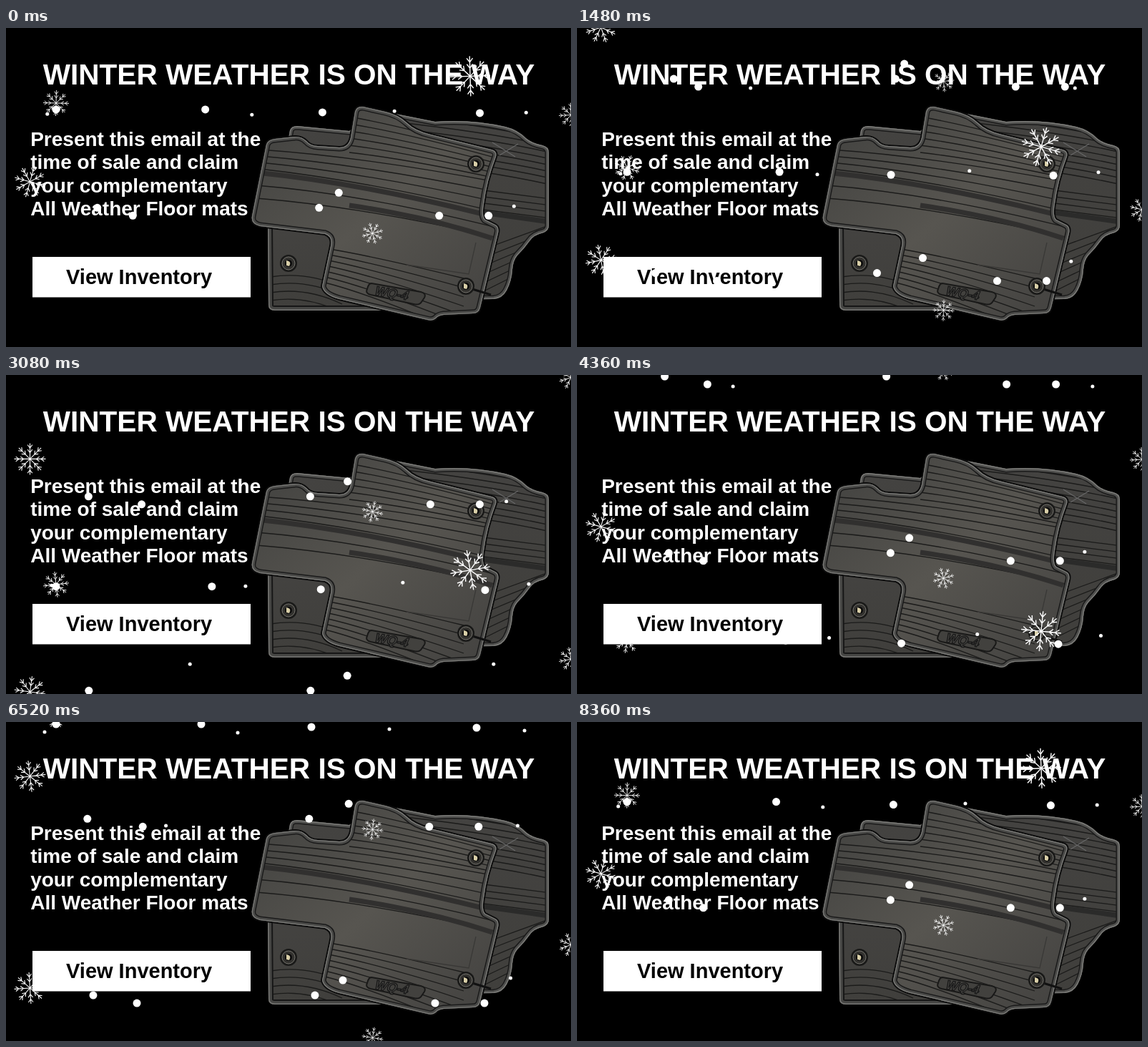
These frames come from a looping animation (790x446 px, 8400 ms). An HTML page:

```html
<!DOCTYPE html>
<html lang="en">
<head>
<meta charset="utf-8">
<title>Winter floor mats</title>
<style>
html, body { margin: 0; width: 100%; height: 100%; overflow: hidden; background: #000; }
svg { display: block; width: 790px; height: 446px; }
text { font-family: "Liberation Sans", Arial, sans-serif; font-weight: bold; }
</style>
</head>
<body>
<svg viewBox="0 0 790 446" xmlns="http://www.w3.org/2000/svg">
  <defs>
    <linearGradient id="rubber" x1="0" y1="0" x2="1" y2="1">
      <stop offset="0" stop-color="#40403e"/>
      <stop offset=".5" stop-color="#575550"/>
      <stop offset="1" stop-color="#42413f"/>
    </linearGradient>
    <linearGradient id="shade" x1="0" y1="0" x2="0" y2="1">
      <stop offset="0" stop-color="#444341"/>
      <stop offset="1" stop-color="#403f3c"/>
    </linearGradient>
    <path id="back" d="M394 160L397 143Q399 137 407 137L480 144L520 115L600 131Q650 127 698 138Q715 142 727 154Q735 161 750 164Q759 166 759 174L759 276Q759 283 752 286Q738 289 732 298Q725 308 715 318Q709 325 708 338Q707 354 700 367Q694 378 682 379L600 380L394 270Z"/>
    <path id="low" d="M366 270L367 387Q367 395 376 395L560 395L668 372L660 260Z"/>
    <path id="front" d="M488 117Q490 109 499 110L530 117Q548 121 560 132Q572 144 594 149L679 170Q687 172 685 180Q672 214 668 246Q665 263 670 268L684 275Q690 278 688 287L669 366L663 391Q661 399 653 399L612 401Q604 402 601 406Q597 410 589 408L466 379Q444 373 442 361L454 305Q457 292 446 288L355 277Q342 274 344 263L364 163Q366 156 376 155L403 152Q413 151 420 158Q426 165 436 165L466 167Q479 167 482 153Z"/>
    <clipPath id="inBack"><use href="#back"/></clipPath>
    <clipPath id="inLow"><use href="#low"/></clipPath>
    <clipPath id="inFront"><use href="#front"/></clipPath>
    <g id="grommet">
      <circle r="12" fill="#191918"/>
      <circle r="9" fill="#33322f" stroke="#77756f"/>
      <circle r="5" fill="#0b0b0b"/>
      <path d="M-3 -4Q5 -3 1 4L-3 3Z" fill="#d9cfa8"/>
    </g>
    <g id="flake" fill="none" stroke="#fff"></g>
  </defs>
  <rect width="790" height="446"/>

  <g fill="none" stroke="#1b1b1a" stroke-width="1.3">
    <use href="#back" fill="url(#shade)" stroke="none"/>
    <g clip-path="url(#inBack)">
      <path id="backRibs"/>
      <path d="M660 257L760 271" stroke="#2b2b2a" stroke-width="7"/>
      <path d="M680 160L712 180M690 178L716 162" stroke="#666"/>
      <use href="#back" stroke="#1a1a1a" stroke-width="11"/>
      <use href="#back" stroke="#50504e" stroke-width="8"/>
      <use href="#back" stroke="#7a7a77" stroke-width="3"/>
    </g>
    <use href="#low" fill="url(#shade)" stroke="none"/>
    <g clip-path="url(#inLow)">
      <path id="lowRibs"/>
      <use href="#low" stroke="#161616" stroke-width="14"/>
      <use href="#low" stroke="#464644" stroke-width="10"/>
      <use href="#low" stroke="#777774" stroke-width="3"/>
    </g>
    <use href="#front" stroke="#0c0c0c" stroke-width="4"/>
    <use href="#front" fill="url(#rubber)" stroke="none"/>
    <g clip-path="url(#inFront)">
      <path id="frontRibs"/>
      <path d="M350 202Q500 217 690 266M480 248Q590 264 680 294" stroke="#31302f" stroke-width="7"/>
      <path d="M657 300L647 344L560 331" stroke="#393836"/>
      <use href="#front" stroke="#1a1a1a" stroke-width="11"/>
      <use href="#front" stroke="#4a4a48" stroke-width="8"/>
      <use href="#front" stroke="#7c7c79" stroke-width="2.5"/>
    </g>
    <path d="M511 357L580 369Q588 371 585 377L581 383Q578 388 570 386L510 373Q502 371 505 365Q507 357 511 357Z" fill="#42413e" stroke="#191918" stroke-width="2"/>
    <text transform="translate(514 373) rotate(9) skewX(-15)" font-size="18" fill="#4a4946" stroke="#181818">WQ-4</text>
    <path d="M652 365L678 373" stroke="#111" stroke-width="3"/>
  </g>
  <use href="#grommet" x="657" y="190"/>
  <use href="#grommet" x="395" y="329"/>
  <use href="#grommet" x="643" y="361"/>

  <g fill="#fff">
    <text x="51.7" y="78.5" font-size="40.6">WINTER WEATHER IS ON THE WAY</text>
    <g font-size="28">
      <text x="34.2" y="165">Present this email at the</text>
      <text x="34.2" y="197">time of sale and claim</text>
      <text x="34.2" y="230">your complementary</text>
      <text x="34.2" y="262">All Weather Floor mats</text>
    </g>
    <rect x="37" y="320" width="305" height="56.5"/>
    <text x="84" y="358" font-size="29" fill="#000">View Inventory</text>
    <g id="snow"></g>
  </g>
</svg>
<script>
const LOOP = 8400, STEP = 40, LEAD = 400;
const $ = id => document.getElementById(id);
const range = (n, f) => Array.from({ length: n }, (_, i) => f(i)).join("");

// Moulded ribs
$("backRibs").setAttribute("d",
  range(8, i => `M540 ${122 + i * 9}Q680 ${137 + i * 9} 770 ${158 + i * 9}`) +
  range(4, i => `M660 ${226 + i * 9}L770 ${240 + i * 9}`) +
  range(6, i => `M660 ${312 + i * 12}L770 ${272 + i * 9}`));
$("lowRibs").setAttribute("d", range(5, i => `M370 ${348 + i * 11}Q420 ${340 + i * 11} 470 ${362 + i * 12}`));
$("frontRibs").setAttribute("d",
  range(6, i => `M480 ${124 + i * 10}Q560 ${138 + i * 9} 690 ${176 + i * 7}`) +
  range(4, i => `M355 ${170 + i * 9}Q500 ${180 + i * 11} 690 ${216 + i * 14}`) +
  range(2, i => `M350 ${220 + i * 18}Q500 ${232 + i * 18} 690 ${280 + i * 14}`) +
  range(7, i => `M446 ${308 + i * 8}Q510 ${318 + i * 9} 640 ${350 + i * 13}`));

$("flake").innerHTML = range(8, i =>
  `<path transform="rotate(${i * 45})" d="M0 0V-20M-3 -18L0 -14L3 -18M-3 -12L0 -8L3 -12"/>`);

// Each part is placed by its age in seconds, counted from its birth times in ms
const parts = [];
function add(births, markup, place) {
  for (const birth of births) {
    const node = document.createElementNS("http://www.w3.org/2000/svg", "g");
    node.innerHTML = markup;
    $("snow").append(node);
    parts.push({ node, birth, place });
  }
}
const dot = (births, r, x, y) =>
  add(births, `<circle r="${r}"/>`, a => `translate(${x(a)} ${y(a)})`);
const flake = (births, x, y, speed, r) =>
  add(births, `<use href="#flake" transform="scale(${r / 20})"/>`,
    a => `translate(${x} ${y + speed * a}) rotate(${(a - 1.6) * 12})`);
const wave = (a, period, peak = 0) => Math.cos((a - peak) / period * 2 * Math.PI);

// Mirrored pairs that come twice per loop
const twice = [360, 4360];
const wide = a => 1 - 2.1 * a + 10.5 * wave(a, 2.8, 0.94);
const light = a => -2 - 2.5 * a + 11 * wave(a, 2.05, 2.1);
for (const [x, y, side] of [[127, 2, 1], [437, 2, 1], [605, 13, 1], [674, 13, 1], [178, 13, -1], [466, -19, -1]])
  dot(twice, 5.5, a => x + side * wide(a), a => y + 61.7 * a);
for (const [x, side] of [[712, 1], [227, -1]])
  dot(twice, 2.5, a => x + side * light(a), a => 16 + 62 * a - 1.05 * a * a);

// Single drifting dots: radius, start, drift, sway
for (const [r, x, y, drift, sway] of [
  [5.5, 427, 7, 4.2, 8], [5.5, 273, 3, 3, 0], [5.5, 70, 3, 0, 0], [5.5, 658, 8, 2.4, 0],
  [2.5, 54, 14, 2, 0], [2.5, 324, 15, 4.5, 12], [2.5, 536, 10, 3.8, 0], [2.5, 725, 12, 1.2, 0]])
  dot([6520], r, a => x + drift * a + sway * wave(a, 6.2, 1.55), a => y + (r > 3 ? 59 : 56.5) * a);

flake([1480, 5480], 33.5, -1, 74, 22);
flake([6940], 649, -30, 66.7, 28);
flake([6679], 70, 0, 61, 18);
flake(twice, 512.5, -7, 72.8, 15);
flake([3030, 7030], 790, -1, 89.5, 17);

function draw() {
  const t = Math.floor(performance.now() % LOOP / STEP) * STEP;
  for (const { node, birth, place } of parts) {
    const age = (t - birth + LEAD + LOOP) % LOOP - LEAD;
    node.setAttribute("transform", place(age / 1000));
  }
  requestAnimationFrame(draw);
}
draw();
</script>
</body>
</html>
```
